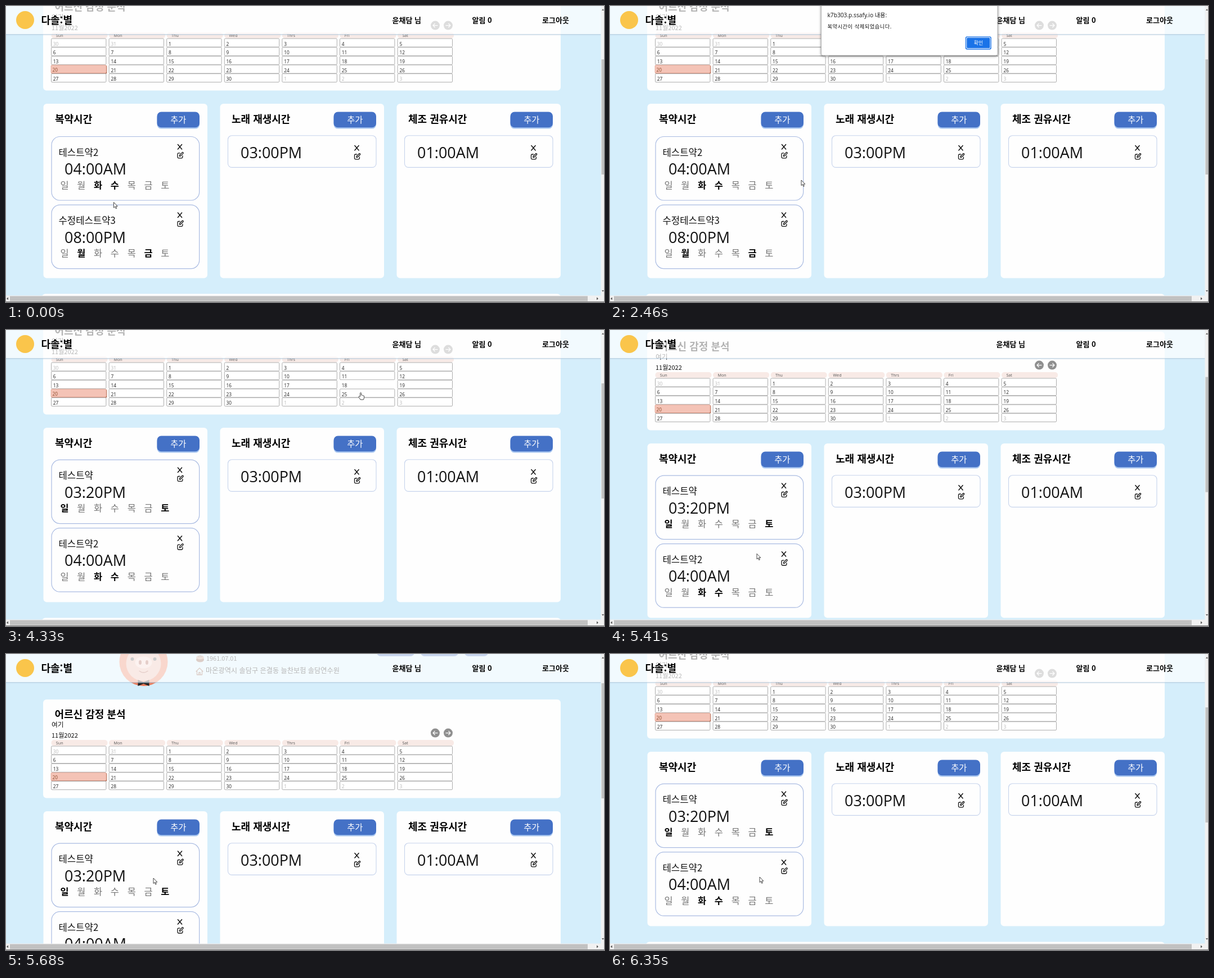
Write an HTML page that moves like this. It is 1063 px wide and 527 px high and loops after 6.41 s.

```html
<!DOCTYPE html>
<html lang="ko">
<head>
<meta charset="utf-8">
<title>복약시간</title>
<style>
html, body { margin: 0; width: 100%; height: 100%; overflow: hidden; background: #d5eefb; }
svg { display: block; width: 1063px; height: 527px; }
text { font-family: "Noto Sans CJK KR", "Noto Sans CJK", "Noto Sans CJK JP", sans-serif; fill: #111; white-space: pre; }
.num { font-family: "Open Sans", "Noto Sans", "Noto Sans CJK KR", sans-serif; }
.title { font-size: 18px; font-weight: 700; fill: #000; }
.nav { font-size: 13px; font-weight: 700; fill: #000; }
.time { font-size: 26.9px; }
.name { font-size: 16.7px; }
.day { font-size: 16.4px; fill: #777; text-anchor: middle; }
.day.on { font-weight: 700; fill: #000; }
.add { font-size: 15.3px; fill: #fff; text-anchor: middle; }
.head { font-size: 7.2px; fill: #555; }
.date { font-size: 8.3px; fill: #222; }
.date.off { fill: #b8b8b8; }
.date.today { fill: #8c4c2c; }
.cell { fill: #fff; stroke: #adadad; }
.icon { fill: none; stroke: #111; stroke-width: 1.3; stroke-linejoin: round; stroke-linecap: round; }
.cursor { fill: #fff; stroke: #333; stroke-width: .9; stroke-linejoin: round; }
</style>
</head>
<body>
<svg id="stage" viewBox="0 0 1063 527"></svg>
<script>
const LOOP = 6410;
const stage = document.getElementById('stage');
const DAYS = '일월화수목금토';

const rect = (x, y, w, h, r, fill, more = '') =>
  `<rect x="${x}" y="${y}" width="${w}" height="${h}" rx="${r}" fill="${fill}" ${more}/>`;
const text = (x, y, cls, str, more = '') =>
  `<text x="${x}" y="${y}" class="${cls}" ${more}>${str}</text>`;
const path = (d, more = '') => `<path d="${d}" ${more}/>`;
const at = (x, y, body, more = '') => `<g transform="translate(${x} ${y})" ${more}>${body}</g>`;

// Close mark with the edit icon below it
const tools = (x, y) => at(x, y,
  path('M-3.6-4.2L3.6 4.2M3.6-4.2L-3.6 4.2', 'class="icon" style="stroke-width:1.5"') +
  path('M0 11.2H-2.2Q-4 11.2-4 13V18.3Q-4 20.1-2.2 20.1H3.1Q4.9 20.1 4.9 18.3V16' +
       'M-.6 16.8L-.2 14.5L4.4 9.9Q5.2 9.5 5.9 10.2Q6.5 10.9 6 11.7L1.6 16.2Z', 'class="icon"'));

const addButton = (x, y) =>
  rect(x, y + 2.3, 75.5, 27.7, 7.5, '#a8c6f0') + rect(x, y, 75.5, 27.7, 7.5, '#4471c6') +
  text(x + 37.8, y + 19.5, 'add', '추가');

const panel = (x, title) =>
  rect(x, 174, 291.5, 310.5, 6, '#fefefe') + text(x + 20.5, 207.5, 'title', title) + addButton(x + 202, 188.6);

const alarm = (x, time) =>
  rect(x + 28, 230.7, 263.5, 56.7, 7, '#fefefe', 'stroke="#c6d3ec" stroke-width="1.1"') +
  text(x + 50.5, 270.5, 'num time', time) + tools(x + 257, 252.8);

function pill(i, name, time, active) {
  const days = [...DAYS].map((d, n) =>
    text(104 + 29.8 * n, 92, active.includes(d) ? 'day on' : 'day', d)).join('');
  return at(0, 232.5 + 121.6 * i,
    rect(81, 0, 262.7, 113.5, 15, '#fefefe', 'stroke="#a9bbe2" stroke-width="1.2"') +
    text(93.5, 34.2, 'name', name) + text(104, 67.6, 'num time', time) + days + tools(309, 18.2));
}

function calendar() {
  let out = rect(66, -25, 920, 175.5, 6, '#fefefe') +
    text(86.5, 7.8, 'title', '어르신 감정 분석') +
    text(81, 24.4, '', '여기', 'font-size="11.8"') +
    text(81, 42.8, '', '11월2022', 'font-size="11"');
  [763, 786].forEach((x, i) => {
    out += at(x, 34.6, '<circle r="8" fill="#8f8f8f"/>' +
      path('M-4 0H4M.8-3.2L4 0L.8 3.2', `class="icon" style="stroke:#fff" transform="scale(${i ? 1 : -1} 1)"`));
  });
  ['Sun', 'Mon', 'Thu', 'Wed', 'Thrs', 'Fri', 'Sat'].forEach((d, c) => {
    const x = 80.5 + 102.6 * c;
    out += rect(x, 47, 100, 10.4, 5, '#f8eae6') + text(x + 8.3, 54.9, 'num head', d);
  });
  for (let n = 0; n < 35; n++) {
    const x = 80.5 + 102.6 * (n % 7), y = 58 + 15.65 * Math.floor(n / 7);
    const day = n < 2 ? 30 + n : n < 32 ? n - 1 : n - 31;
    const off = n < 2 || n > 31;
    if (day === 20 && !off) {
      out += rect(x, y + .8, 98.8, 14.9, 2, '#a85f46') +
        rect(x - .5, y + .2, 98.3, 14.4, 2, '#f4c3b6', 'stroke="#d89480" stroke-width=".6"') +
        text(x + 2, y + 12.5, 'num date today', day);
    } else {
      out += rect(x, y, 97.4, 15, 1.5, '#fff', `class="cell" ${day === 18 ? 'id="hovered"' : ''}`) +
        text(x + 3.3, y + 12.8, 'num date' + (off ? ' off' : ''), day);
    }
  }
  return out;
}

function profile() {
  const pig = '<circle r="43" fill="#eb7a58"/>' +
    path('M-31-32Q-22-36-13-27L-27-14ZM31-32Q22-36 13-27L27-14Z', 'fill="#e89a88"') +
    '<ellipse cy="3" rx="31" ry="31" fill="#ecb9ad"/>' +
    '<ellipse cy="1" rx="15" ry="10.5" fill="#f6d5cc"/>' +
    '<circle cx="-20" cy="-5" r="3" fill="#555"/><circle cx="20" cy="-5" r="3" fill="#555"/>' +
    '<ellipse cx="-6" cy="1" rx="2.5" ry="4" fill="#a85a4c"/><ellipse cx="6" cy="1" rx="2.5" ry="4" fill="#a85a4c"/>' +
    path('M-8 16Q0 22 8 16', 'fill="none" stroke="#a85a4c" stroke-width="1.5"') +
    path('M-10 32L0 36L10 32V43L0 39L-10 43Z', 'fill="#222"');
  const cake = '<ellipse cy="2" rx="7" ry="4.5" fill="#8a5a48"/><ellipse cy="-2" rx="7" ry="3.6" fill="#c9a08c"/>' +
    path('M-3-5V-2M0-6V-2M3-5V-2', 'stroke="#666"');
  const home = path('M-6 0L0-6L6 0M-4.5-1V6H4.5V-1M-1.3 6V2H1.3V6', 'class="icon" style="stroke:#8a5a48"');
  return at(244.5, -92, pig) + at(345, -98, cake) + at(344, -75, home) +
    text(356, -94, '', '1961.07.01', 'font-size="10.9"') +
    text(355, -71.6, '', '마온광역시 솔담구 은결동 늘찬보험 솔담연수원', 'font-size="12.2"') +
    [[659, 67], [737, 67], [815, 42]].map(([x, w]) => rect(x, -130, w, 28, 7, '#4471c6')).join('');
}

const columns = [66.5, 380.5, 694.5];
const page = profile() + calendar() +
  ['복약시간', '노래 재생시간', '체조 권유시간'].map((s, i) => panel(columns[i], s)).join('') +
  alarm(columns[1] - 14, '03:00PM') + alarm(columns[2] - 14, '01:00AM') +
  `<g id="before">${pill(0, '테스트약2', '04:00AM', '화수') + pill(1, '수정테스트약3', '08:00PM', '월금')}</g>` +
  at(0, -1.4, pill(0, '테스트약', '03:20PM', '일토') + pill(1, '테스트약2', '04:00AM', '화수'), 'id="after"') +
  rect(64, 512.5, 922, 200, 6, '#fefefe');

const header = rect(0, 0, 1057.5, 50, 0, '#fff', 'opacity=".7"') +
  rect(0, 50, 1057.5, 1.2, 0, '#b4cbdd', 'opacity=".8"') +
  rect(0, 51.2, 1057.5, 1.3, 0, '#b4cbdd', 'opacity=".25"') +
  '<circle cx="34" cy="25" r="16" fill="#fac54b"/>' +
  text(62.5, 32.3, 'title', '다솔:별') + text(686.5, 30, 'nav', '윤채담 님') +
  text(828.5, 30, 'nav', '알림 0') + text(953, 30, 'nav', '로그아웃');

const bars = rect(1057.5, 0, 6, 516, 0, '#f1f1f1') +
  rect(1058.5, 95, 4.5, 205, 0, '#c1c1c1', 'id="thumb"') +
  path('M1059 8L1061 5L1063 8ZM1059 506L1061 509L1063 506Z', 'fill="#666"') +
  rect(0, 515.5, 1063, 11.5, 0, '#f1f1f1') + rect(7, 516.5, 1027, 9, 0, '#c1c1c1') +
  path('M4 518.5L1 521L4 523.5ZM1050 518.5L1053 521L1050 523.5Z', 'fill="#555"') +
  rect(0, 526, 1063, 1, 0, '#777');

const dialog = `<g id="dialog">` +
  rect(375.5, -8, 313.5, 96, 3, '#fff', 'stroke="#b5b5b5" style="filter:drop-shadow(0 1px 2px #0007)"') +
  text(386.5, 20.3, 'num', 'k7b303.p.ssafy.io 내용:', 'font-size="10.2"') +
  text(386.5, 40.2, '', '복약시간이 삭제되었습니다.', 'font-size="9.2" letter-spacing=".55"') +
  rect(631.8, 54.2, 46, 23.2, 3, '#1a73e8') + rect(633.2, 55.6, 43.2, 20.4, 2, '#fff') +
  rect(634.2, 56.6, 41.2, 18.4, 1.5, '#1a73e8') +
  text(655, 69, '', '확인', 'font-size="9" style="fill:#fff" text-anchor="middle"') + '</g>';

const cursor = `<g id="cursor" class="cursor">` +
  path('M0 0V9.6L2.2 7.6L3.8 11.3L5.3 10.6L3.8 7.1H6.8Z', 'id="arrow"') +
  path('M-1 7.5V1Q0-.8 1 1V5Q2.3 4.3 3 5.4Q4.3 4.8 4.8 6Q6 5.5 6 7V9.5Q5.8 11 5 13H-.5Q-1.5 11-3.4 8.7Q-3.8 6.6-2.2 7Z', 'id="hand"') + '</g>';

stage.innerHTML = `<g id="page">${page}</g>` + header + bars + dialog + cursor;
const el = Object.fromEntries([...stage.querySelectorAll('[id]')].map(e => [e.id, e]));

// Keys: [step, value, ...]
const move = [
  [15, 191.5, 349.5], [20, 276, 391.5], [22, 276, 391.5], [26, 312, 376], [28, 310, 366], [32, 305, 370],
  [34, 305, 370], [37, 340, 310], [40, 470, 180], [43, 578, 97.5], [44, 619.5, 84.5], [46, 620, 84],
  [50, 652, 57.5], [60, 652, 57.5], [65, 630.5, 111], [67, 480, 230], [69, 210.5, 399.5],
  [74, 238, 390], [79, 260.5, 398], [85, 262, 399], [95, 266, 397]
];
const scroll = [
  [79, 0], [80, 8], [81, 28], [83, 72], [85, 106], [86, 111], [87, 110],
  [88, 96], [89, 68], [90, 34], [91, 14], [92, 4], [95, 0]
];

function sample(keys, k) {
  const i = keys.findIndex(key => key[0] >= k);
  if (i === 0) return keys[0].slice(1);
  if (i < 0) return keys[keys.length - 1].slice(1);
  const a = keys[i - 1], b = keys[i], u = (k - a[0]) / (b[0] - a[0]);
  return a.slice(1).map((v, n) => v + (b[n + 1] - v) * u);
}

const within = (k, a, b) => k >= a && k < b;
const show = (e, on) => { e.style.display = on ? '' : 'none'; };

function draw(t) {
  const k = Math.min(95, Math.floor((t + 23) / 66.96));
  const [x, y] = sample(move, k);
  const s = Math.round(sample(scroll, k)[0]);
  const pointing = within(k, 29, 36) || within(k, 62, 67);
  el.cursor.setAttribute('transform', `translate(${x} ${y})`);
  show(el.arrow, !pointing);
  show(el.hand, pointing);
  el.page.setAttribute('transform', `translate(0 ${s})`);
  el.thumb.setAttribute('y', 95 - .405 * s);
  show(el.dialog, within(k, 36, 60));
  show(el.before, k < 62);
  show(el.after, k >= 62);
  el.hovered.style.stroke = within(k, 64, 66) ? 'none' : '';
}

const start = performance.now();
function tick() {
  draw((performance.now() - start) % LOOP);
  requestAnimationFrame(tick);
}
tick();
</script>
</body>
</html>
```
